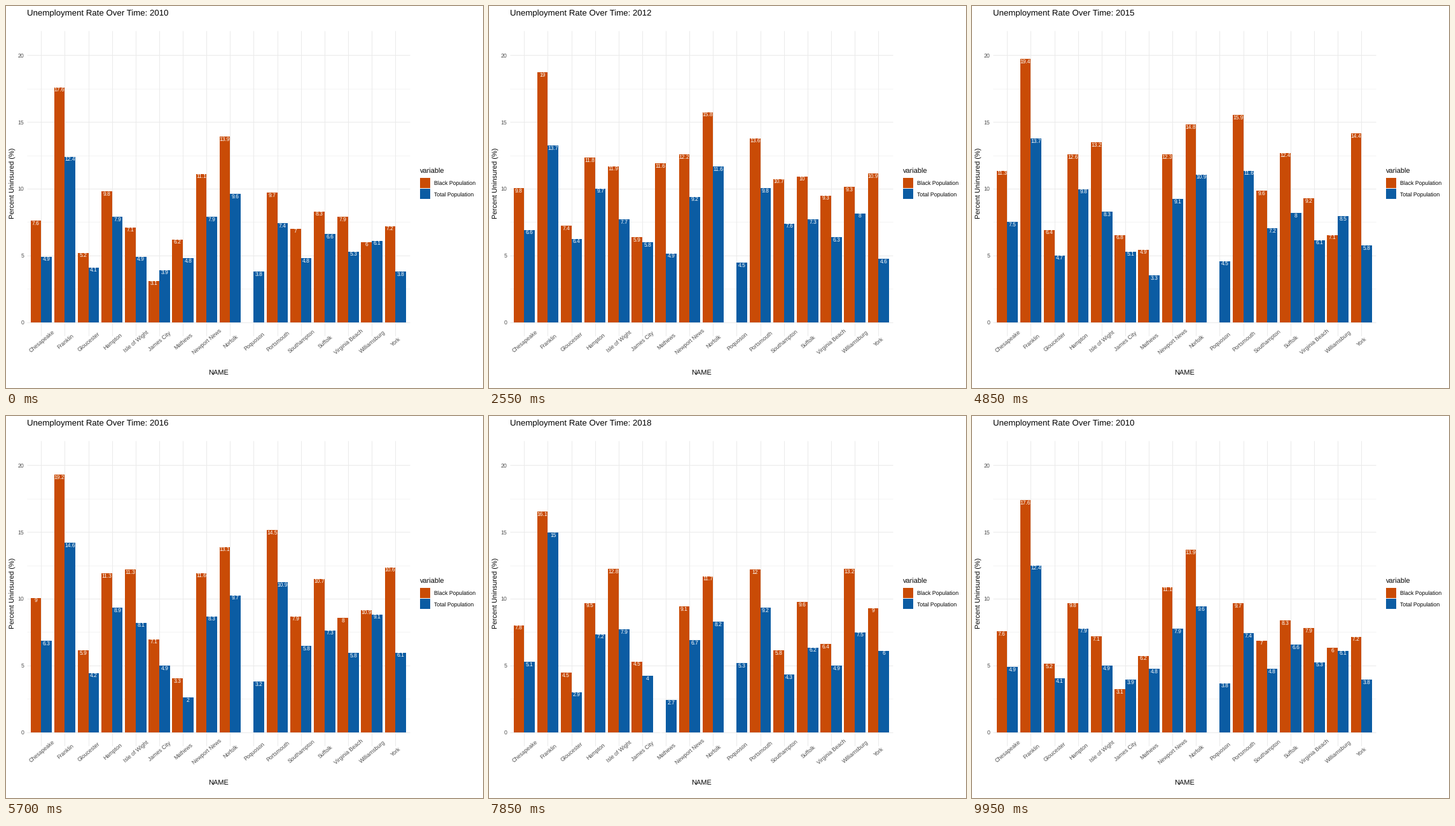
These frames come from a looping animation (750x600 px, 10 s). A matplotlib script:

```python
import math

import matplotlib.pyplot as plt
from matplotlib.animation import FuncAnimation
from matplotlib.patches import Rectangle

plt.rcParams["font.family"] = "Liberation Sans"
plt.rcParams["text.hinting"] = "none"

W, H, DPI = 750, 600, 100
STEPS = 20                      # frames per year
ORANGE, BLUE = "#C94B06", "#0B5CA3"
GRID, GREY = "#EBEBEB", "#4D4D4D"
LEFT, RIGHT, TOP, BOTTOM = 33, 634.6, 38.8, 518.4
FIRST_X, GAP = 55.3, 37.13
BAR_W = 0.45 * GAP
ZERO_Y, UNIT = 496.6, 20.96
NA = math.nan

PLACES = ["Chesapeake", "Franklin", "Gloucester", "Hampton", "Isle of Wight",
          "James City", "Mathews", "Newport News", "Norfolk", "Poquoson",
          "Portsmouth", "Southampton", "Suffolk", "Virginia Beach",
          "Williamsburg", "York"]

years, rates = [], []


def add_year(year, black, total):
    years.append(year)
    rates.append(black + total)


add_year(2010,
         [7.6, 17.6, 5.2, 9.8, 7.1, 3.1, 6.2, 11.1, 13.9, NA, 9.7, 7, 8.3, 7.9, 6, 7.2],
         [4.9, 12.4, 4.1, 7.9, 4.9, 3.9, 4.8, 7.9, 9.6, 3.8, 7.4, 4.8, 6.6, 5.3, 6.1, 3.8])
add_year(2011,
         [9.4, 19.4, 6.4, 10.3, 10, 4.3, 8.7, 12.3, 14.3, NA, 10.9, 10.3, 9.8, 9, 7.2, 10.1],
         [6, 13.8, 5.2, 8.3, 6.3, 4.6, 5.8, 8.8, 10.4, 4.7, 8.2, 6.4, 7.3, 5.8, 6.5, 4.5])
add_year(2012,
         [9.8, 19, 7.4, 11.8, 11.9, 5.9, 11.6, 12.2, 15.8, NA, 13.6, 10.7, 10, 9.3, 9.3, 10.9],
         [6.6, 13.7, 6.4, 9.7, 7.7, 5.8, 4.9, 9.2, 11.6, 4.5, 9.8, 7.6, 7.3, 6.3, 8, 4.6])
add_year(2013,
         [10.6, 18.1, 6.8, 13.5, 11.2, 7.4, 12.6, 13.4, 15.6, NA, 14.2, 10.8, 13, 9.9, 12, 11.7],
         [7.6, 12.2, 5.9, 10.7, 7.7, 6.4, 5.7, 9.8, 11.8, 4.4, 10.6, 6.9, 8.6, 6.5, 8.5, 5.1])
add_year(2014,
         [11.5, 20.8, 8.6, 12.5, 14.4, 5.6, 7.2, 13.5, 14.9, NA, 14.3, 10.7, 13.6, 9.5, 4.6, 13.3],
         [7.6, 14, 6, 10.5, 8.2, 5.9, 4.2, 9.7, 11.6, 4.8, 10.5, 6.5, 8.8, 6.3, 6.1, 5.6])
add_year(2015,
         [11.3, 19.4, 6.4, 12.6, 13.2, 6.8, 4.9, 12.3, 14.8, NA, 15.9, 9.6, 12.4, 9.2, 7.1, 14.4],
         [7.5, 13.7, 4.7, 9.8, 8.3, 5.1, 3.3, 9.1, 10.9, 4.5, 11.6, 7.2, 8, 6.1, 8.5, 5.8])
add_year(2016,
         [9, 19.2, 5.9, 11.3, 11.3, 7.1, 3.3, 11.6, 13.1, NA, 14.5, 7.9, 10.7, 8, 10.9, 10.6],
         [6.3, 14.6, 4.2, 8.9, 8.1, 4.9, 2, 8.3, 9.7, 3.2, 10.9, 5.8, 7.3, 5.8, 9.1, 6.1])
add_year(2017,
         [8.7, 18, 4.3, 10.3, 10.3, 7.9, 0, 10.5, 11.6, NA, 12.8, 7.2, 10.3, 7.3, 9, 10.3],
         [5.8, 14.8, 3.3, 7.8, 7, 4.9, 1.4, 7.5, 8.5, 4.8, 9.7, 4.3, 6.8, 5.3, 7.4, 6.4])
add_year(2018,
         [7.8, 16.1, 4.5, 9.5, 12.8, 4.5, 0, 9.1, 11.7, NA, 12, 5.8, 9.6, 6.4, 13.2, 9],
         [5.1, 15, 2.9, 7.2, 7.9, 4, 2.7, 6.7, 8.2, 5.3, 9.2, 4.3, 6.2, 4.9, 7.5, 6])
add_year(2019,
         [7.1, 14.9, 4.3, 8.2, 8.2, 4.7, 0, 8, 10.9, NA, 9.2, 5.1, 9.3, 6.6, 10.2, 6.4],
         [4.8, 13.5, 3.2, 6.2, 6.1, 4.3, 4.2, 6, 7.4, 2, 7.7, 4.2, 6, 4.5, 6, 5.6])

fig = plt.figure(figsize=(W / DPI, H / DPI), dpi=DPI, facecolor="white")
ax = fig.add_axes([0, 0, 1, 1])
ax.set_xlim(0, W)
ax.set_ylim(H, 0)
ax.axis("off")


def pt(px):
    return px * 72 / DPI


def text(x, y, s, size, color="black", ha="left", angle=0):
    return ax.text(x, y, s, fontsize=pt(size), color=color, ha=ha, va="baseline",
                   rotation=angle, rotation_mode="anchor", zorder=4)


def box(x, y, w, h, color):
    return ax.add_patch(Rectangle((x, y), w, h, facecolor=color, linewidth=0, zorder=2))


def y_of(value):
    return ZERO_Y - UNIT * value


def x_of(place):
    return FIRST_X + GAP * place


def draw_frame_parts():
    minor = [y_of(v) for v in (2.5, 7.5, 12.5, 17.5)]
    major = [y_of(v) for v in (0, 5, 10, 15, 20)]
    ax.hlines(minor, LEFT, RIGHT, colors=GRID, linewidths=pt(0.53), zorder=0)
    ax.hlines(major, LEFT, RIGHT, colors=GRID, linewidths=pt(1.07), zorder=1)
    ax.vlines([x_of(i) for i in range(len(PLACES))], TOP, BOTTOM,
              colors=GRID, linewidths=pt(1.07), zorder=1)
    for v in (0, 5, 10, 15, 20):
        text(28.3, y_of(v) + 3.3, str(v), 8.8, GREY, "right")
    for i, name in enumerate(PLACES):
        text(x_of(i) + 2.6, 529, name, 8.8, GREY, "center", 40)
    text((LEFT + RIGHT) / 2, 579.3, "NAME", 11, ha="center")
    text(13.3, (TOP + BOTTOM) / 2, "Percent Uninsured (%)", 11, ha="center", angle=90)
    text(650.5, 263, "variable", 11)
    for y, color, name in ((270, ORANGE, "Black"), (287, BLUE, "Total")):
        box(651, y, 16, 16, color)
        text(673.2, y + 11.4 + (y > 280) * 0.5, name + " Population", 8.8)


draw_frame_parts()
title = text(33, 15, "", 13.2)
bars, labels = [], []
for side, color in enumerate((ORANGE, BLUE)):
    for i in range(len(PLACES)):
        x = x_of(i) + (side - 1) * BAR_W
        bars.append(box(x, ZERO_Y, BAR_W, 0, color))
        labels.append(text(x + BAR_W / 2, ZERO_Y, "", 8.54, "white", "center"))


def update(frame):
    state, step = divmod(frame, STEPS)
    hold = 7 if state else 6
    t = max(0, (step - hold) / (STEPS - hold))
    following = (state + 1) % len(years)
    nearest = state if t < 0.5 else following
    title.set_text(f"Unemployment Rate Over Time: {years[nearest]}")
    for bar, label, a, b, shown in zip(bars, labels, rates[state],
                                       rates[following], rates[nearest]):
        if math.isnan(a):
            continue
        y = y_of(a + (b - a) * t)
        bar.set_y(y)
        bar.set_height(ZERO_Y - y)
        label.set_y(y + 6.5)
        label.set_text(f"{shown:g}")
    return [title, *bars, *labels]


anim = FuncAnimation(fig, update, frames=STEPS * len(years), interval=50,
                     repeat=True, repeat_delay=0)
plt.show()
```
